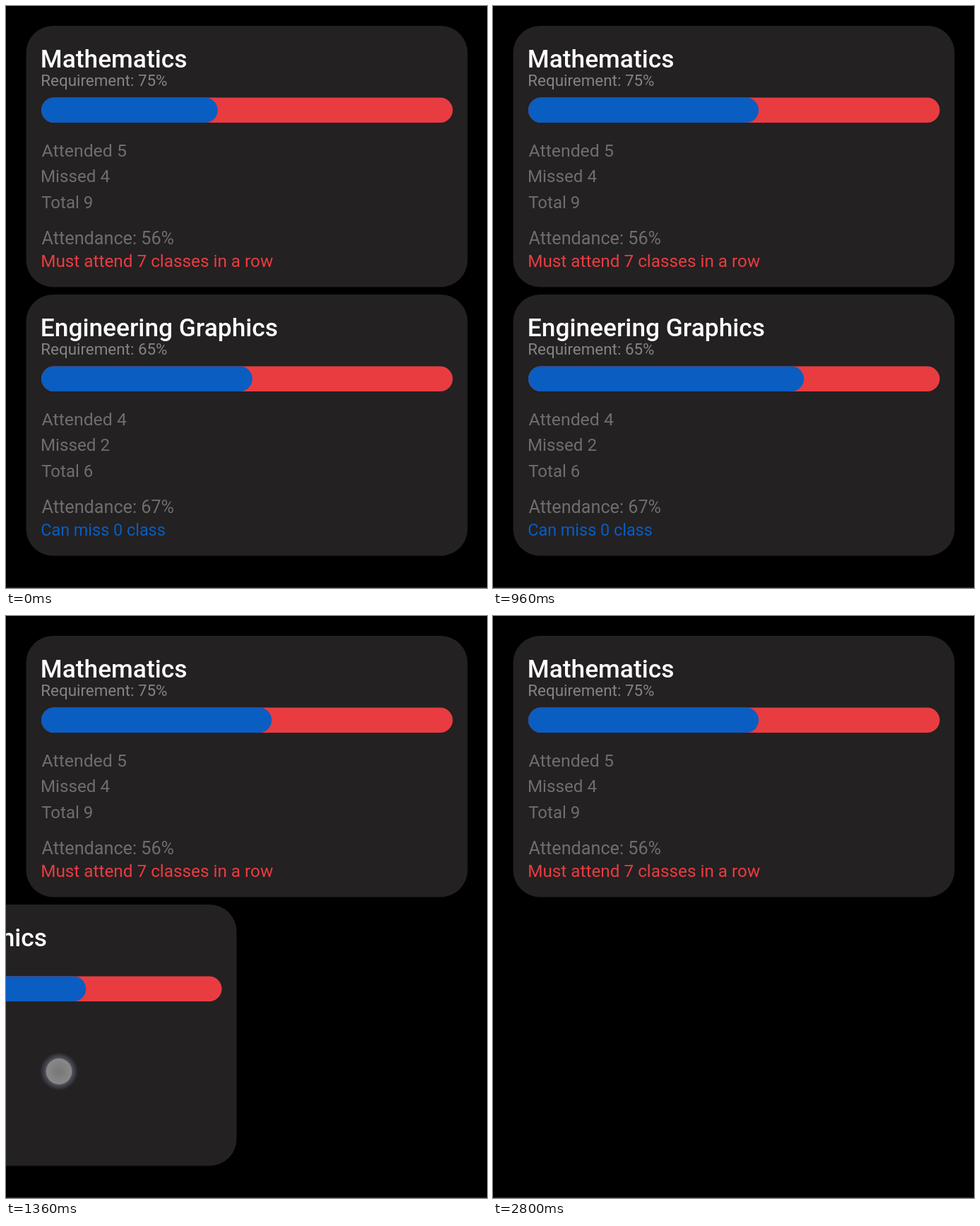
Animation of 681x823 px, one loop 2.96 s. Source, as an HTML page:

```html
<!DOCTYPE html>
<html lang="en">
<head>
<meta charset="utf-8">
<title>Attendance cards</title>
<style>
  html, body { margin: 0; width: 100%; height: 100%; overflow: hidden; background: #000; }
  svg { display: block; width: 681px; height: 823px; }
  text { font-family: Roboto, "Noto Sans", sans-serif; fill: #6f6e6f; }
  .title { font-weight: 500; fill: #fff; }
  .note { fill: #858485; }
  .red { fill: #e93c41; }
  .blue { fill: #0a5dc1; }
</style>
</head>
<body>
<svg viewBox="0 0 681 823">
  <defs>
    <radialGradient id="face">
      <stop offset="0" stop-color="#fff" stop-opacity=".62"/>
      <stop offset="1" stop-color="#fff" stop-opacity=".76"/>
    </radialGradient>
    <radialGradient id="halo">
      <stop offset=".66" stop-color="#c8cdf0" stop-opacity=".5"/>
      <stop offset="1" stop-color="#c8cdf0" stop-opacity="0"/>
    </radialGradient>
  </defs>
  <rect y="822" width="681" height="1" fill="#2a2a2a"/>
  <g id="cards"></g>
  <g id="touch" opacity="0">
    <path d="M-27 0a27 27 0 1 0 54 0a27 27 0 1 0-54 0M-18.5 0a18.5 18.5 0 1 0 37 0a18.5 18.5 0 1 0-37 0"
      fill="url(#halo)" fill-rule="evenodd"/>
    <circle r="18.5" fill="url(#face)" stroke="#8890c0" stroke-opacity=".5"/>
  </g>
</svg>
<script>
const LOOP = 2960, STEP = 80;
const BAR_X = 50, BAR_W = 582.5;
const SVG = 'http://www.w3.org/2000/svg';

const courses = [
  { name: 'Mathematics', need: 75, attended: 5, missed: 4, top: 28,
    advice: 'Must attend 7 classes in a row', tone: 'red', size: 24.3 },
  { name: 'Engineering Graphics', need: 65, attended: 4, missed: 2, top: 408,
    advice: 'Can miss 0 class', tone: 'blue', size: 23.4 }
];

// time, card offset, touch x, touch y, touch opacity
const swipe = [
  [1120, 0, 185, 639, 0],
  [1200, 0, 185, 639, 1],
  [1280, -88, 97, 643, 1],
  [1360, -327, 75, 644, 0.62],
  [1440, -700, 75, 644, 0.18],
  [1520, -700, 75, 644, 0]
];

function add(parent, tag, attrs, content = '') {
  const node = document.createElementNS(SVG, tag);
  for (const key in attrs) node.setAttribute(key, attrs[key]);
  node.textContent = content;
  return parent.appendChild(node);
}

function addCard(c) {
  const g = add(document.getElementById('cards'), 'g', {});
  const inner = add(g, 'g', { transform: `translate(0 ${c.top})` });
  const line = (content, x, y, size, cls = '') =>
    add(inner, 'text', { x, y, 'font-size': size, class: cls }, content);
  const bar = cls => add(inner, 'rect',
    { x: BAR_X, y: 101.5, width: BAR_W, height: 35.5, rx: 17.75, class: cls });
  const total = c.attended + c.missed;
  const ratio = c.attended / total;

  add(inner, 'rect', { x: 28.5, y: 0, width: 625, height: 369.5, rx: 38, fill: '#232122' });
  line(c.name, 48.8, 59, 35.3, 'title');
  line(`Requirement: ${c.need}%`, 49.3, 85, 22.4, 'note');
  bar('red');
  const fill = bar('blue');
  line(`Attended ${c.attended}`, 50.6, 184.5, 24.8);
  line(`Missed ${c.missed}`, 49, 221, 24.2);
  line(`Total ${total}`, 50.2, 258, 24);
  line(`Attendance: ${Math.round(ratio * 100)}%`, 50.6, 308.5, 25.2);
  line(c.advice, 49.2, 341, c.size, c.tone);
  return { g, fill, width: BAR_W * Math.round(ratio * 100) / 100 };
}

const cards = courses.map(addCard);
const touch = document.getElementById('touch');

// The fill is already under way when the loop begins.
function progress(t) {
  const left = Math.max(0, 1 - (t + 563) / 1468);
  return 1 - left ** 3;
}

function draw(now) {
  const t = Math.floor((now % LOOP) / STEP) * STEP;
  for (const card of cards) card.fill.setAttribute('width', card.width * progress(t));
  const [, shift, x, y, opacity] = swipe.findLast(s => s[0] <= t) || swipe[0];
  cards[1].g.setAttribute('transform', `translate(${shift} 0)`);
  touch.setAttribute('transform', `translate(${x} ${y})`);
  touch.setAttribute('opacity', opacity);
}

const start = performance.now();
function tick() {
  draw(performance.now() - start);
  requestAnimationFrame(tick);
}
tick();
</script>
</body>
</html>
```
